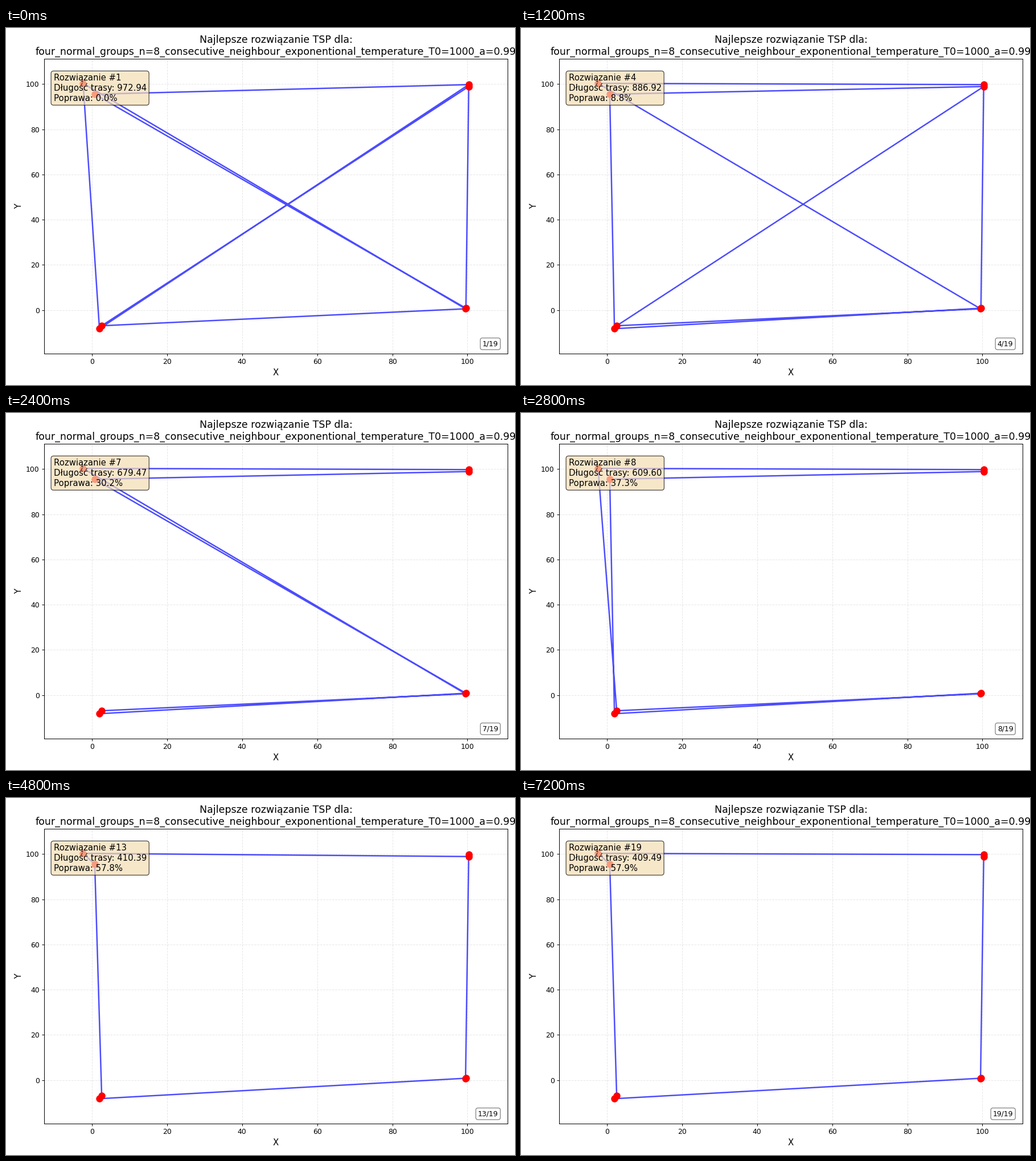
Write a matplotlib script that moves like this. It is 894 px wide and 626 px high and loops after 7.6 s.

```python
import matplotlib.pyplot as plt
from matplotlib.animation import FuncAnimation

WIDTH, HEIGHT, DPI = 894, 626, 89.4
LEFT, RIGHT, TOP, BOTTOM = 67.3, 880.8, 54.0, 570.6

# Two cities near each corner of a square
CITIES = {
    "A": (-2.35, 100.3), "a": (0.75, 95.5),
    "B": (100.35, 99.75), "b": (100.35, 98.9),
    "C": (99.6, 0.85), "c": (99.5, 0.6),
    "D": (2.6, -6.9), "d": (2.0, -8.2),
}

# Visiting order and length of every successive best tour
TOURS = [
    ("AdBaCbDc", 972.94), ("ABdaCbDc", 971.02), ("ABdCabDc", 967.11),
    ("ABCdabDc", 886.92), ("ABCdDabc", 744.16), ("ABbCdDac", 683.28),
    ("ABbaCdDc", 679.47), ("adCcDABb", 609.60), ("aDcCdABb", 609.58),
    ("aDcCdBbA", 553.21), ("ABbDdCca", 489.74), ("aADdCcBb", 412.28),
    ("AaDdCcBb", 410.39), ("AadDCcbB", 410.05),
] + [("AaDdCcbB", 409.49)] * 5

plt.rcParams["font.family"] = "DejaVu Sans"

# The small surplus keeps the pixel size from rounding down
fig = plt.figure(figsize=((WIDTH + 1e-3) / DPI, (HEIGHT + 1e-3) / DPI), dpi=DPI)
ax = fig.add_axes([LEFT / WIDTH, 1 - BOTTOM / HEIGHT,
                   (RIGHT - LEFT) / WIDTH, (BOTTOM - TOP) / HEIGHT])
ax.set_xlim(-12.68, 110.67)
ax.set_ylim(-19.13, 111.17)
ax.set_xticks(range(0, 101, 20))
ax.set_yticks(range(0, 101, 20))
ax.grid(True, linestyle="--", alpha=0.3)
ax.set_xlabel("X", fontsize=12)
ax.set_ylabel("Y", fontsize=12)
ax.set_title("Najlepsze rozwiązanie TSP dla:\n"
             "four_normal_groups_n=8_consecutive_neighbour_"
             "exponentional_temperature_T0=1000_a=0.99", fontsize=14)

route, = ax.plot([], [], "b-", linewidth=2, alpha=0.7)
ax.plot(*zip(*CITIES.values()), "ro", markersize=9, zorder=2.5)


def boxed_text(x, y, size, ha, va, color, alpha):
    box = dict(boxstyle="round", facecolor=color, alpha=alpha)
    return ax.text(x, y, "", transform=ax.transAxes, fontsize=size,
                   ha=ha, va=va, bbox=box)


info = boxed_text(0.02, 0.95, 12, "left", "top", "wheat", 0.7)
counter = boxed_text(0.98, 0.02, 10, "right", "bottom", "white", 0.5)


def update(step):
    order, length = TOURS[step]
    route.set_data(*zip(*(CITIES[name] for name in order + order[0])))
    gain = 100 * (1 - length / TOURS[0][1])
    info.set_text(f"Rozwiązanie #{step + 1}\n"
                  f"Długość trasy: {length:.2f}\n"
                  f"Poprawa: {gain:.1f}%")
    counter.set_text(f"{step + 1}/{len(TOURS)}")
    return route, info, counter


anim = FuncAnimation(fig, update, frames=len(TOURS), interval=400,
                     repeat=True, repeat_delay=0)
plt.show()
```
